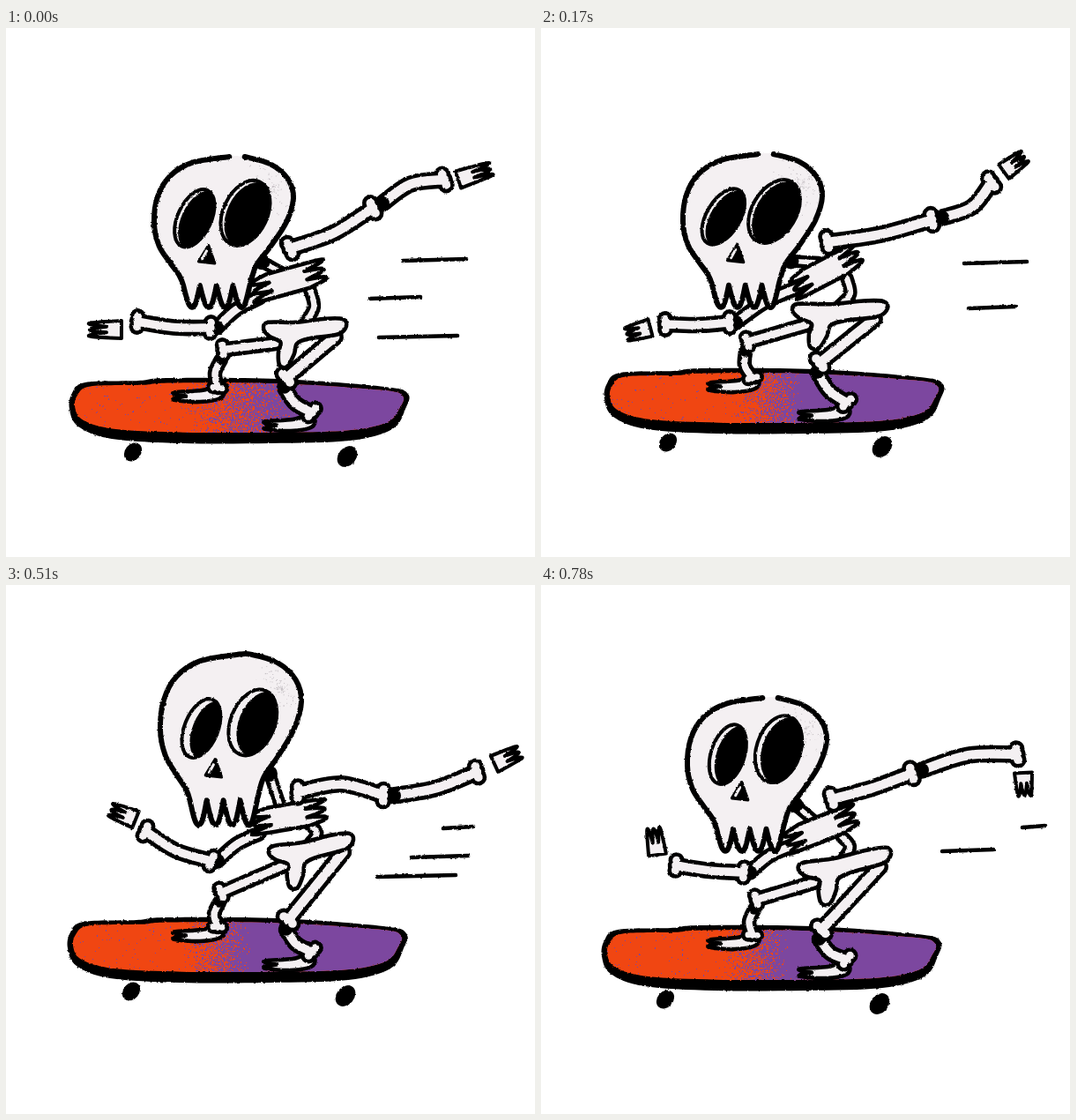
An HTML page with a canvas that plays this animation: 600x600 px, repeating every 0.85 s.

```html
<!DOCTYPE html>
<html lang="en">
<head>
<meta charset="utf-8">
<title>Skating skeleton</title>
<style>
html, body { margin: 0; width: 100%; height: 100%; overflow: hidden; background: #fff; }
canvas { position: absolute; left: 0; top: 0; width: 600px; height: 600px; filter: url(#rough); }
svg { position: absolute; width: 0; height: 0; }
</style>
</head>
<body>
<svg><filter id="rough" x="0" y="0" width="100%" height="100%" color-interpolation-filters="sRGB">
<feTurbulence type="fractalNoise" baseFrequency=".3" numOctaves="2" seed="4" result="n"/>
<feDisplacementMap in="SourceGraphic" in2="n" scale="2.5" xChannelSelector="R" yChannelSelector="G"/>
</filter></svg>
<script>
const STEP = 170, INK = '#000', BONE = '#f4f0f2', ORANGE = '#f04612', PURPLE = '#7c479f', PEN = 4.6;

// skull: centre x, top, half width, height. look: tilt, eye level, pupil shift.
// Hands: wrist edge, direction, length. Lines: x, y, length.
const poses = [
  {
    board: [0, 0], blend: [190, 335], skull: [247, 146, 79, 168], gap: true, look: [25, .4, 4],
    ribs: [320, 287, -18], pelvis: [[292, 341], [386, 338]], knees: [[246, 365], [318, 397]],
    back: { shoulder: [322, 250], joint: [427, 199], wrist: [497, 172], bows: [6, -9], hand: [513, 172, -18, 36] },
    front: { elbow: [239, 340], wrist: [149, 333], bow: -3, hand: [131, 342, 180, 34] },
    lines: [[450, 264, 72], [413, 307, 57], [423, 351, 89]]
  },
  {
    board: [0, -11], blend: [215, 305], skull: [240, 143, 79, 171], gap: true, look: [31, .4, 4],
    ribs: [323, 276, -30], pelvis: [[285, 320], [393, 318]], knees: [[234, 356], [316, 380]],
    back: { shoulder: [325, 243], joint: [455, 215], wrist: [511, 175], bows: [4, 10], hand: [525, 163, -36, 27] },
    front: { elbow: [221, 334], wrist: [141, 336], bow: -2, hand: [124, 340, 165, 26] },
    lines: [[480, 267, 71], [485, 318, 53]]
  },
  {
    board: [0, -24], blend: [240, 305], skull: [256.5, 81, 81, 186], look: [17, .425, 9],
    ribs: [320, 260, -15], pelvis: [[297, 298], [396, 297]], knees: [[234, 344], [318, 376]],
    back: { shoulder: [330, 226], joint: [447, 226], wrist: [522, 176], bows: [-5, 14], hand: [531, 167, -85, 34] },
    front: { elbow: [240, 308], wrist: [163, 279], bow: -3, hand: [147, 279, 108, 28] },
    lines: [[507, 259, 15], [544, 291, 11]]
  },
  {
    board: [-2, -20], blend: [195, 285], skull: [255, 79, 80, 190], look: [22, .425, 9],
    ribs: [320, 263, -12], pelvis: [[298, 304], [394, 289]], knees: [[244, 349], [320, 380]],
    back: { shoulder: [331, 235], joint: [440, 239], wrist: [534, 212], bows: [-11, 5], hand: [554, 203, -25, 29] },
    front: { elbow: [240, 313], wrist: [158, 279], bow: -6, hand: [147, 266, 202, 28] },
    lines: [[496, 276, 34], [460, 309, 64], [421, 331, 89]]
  },
  {
    board: [-3, -11], blend: [200, 292], skull: [245, 128, 79, 171], gap: true, look: [18, .36, 6],
    ribs: [317, 277, -24], pelvis: [[292, 323], [397, 305]], knees: [[244, 357], [318, 391]],
    back: { shoulder: [330, 243], joint: [432, 210], wrist: [540, 192], bows: [2, -8], hand: [547, 213, 87, 24] },
    front: { elbow: [237, 326], wrist: [153, 318], bow: -2, hand: [132, 306, -98, 28] },
    lines: [[455, 302, 58], [546, 275, 26]]
  }
];

let g, seed;
const rand = () => (seed = seed * 16807 % 2147483647) / 2147483647;
const add = ([x, y], dx, dy) => [x + dx, y + dy];

// Places local points at an origin, turned by an angle in degrees.
function place([ox, oy], deg, pts) {
  const c = Math.cos(deg * Math.PI / 180), s = Math.sin(deg * Math.PI / 180);
  return pts.map(([x, y, sharp]) => [ox + x * c - y * s, oy + x * s + y * c, sharp]);
}

// Row of rounded tips with sharp valleys between them.
function fingers(n, valley, tip, from, to) {
  const step = (to - from) / n, pts = [];
  for (let i = 0; i < n; i++) {
    const y = from + step * i;
    pts.push([tip, y + step * .3], [tip, y + step * .65], [valley, y + step, 1]);
  }
  return pts;
}

// Smooth path through [x, y, sharp] points.
function curve(p, closed) {
  const n = p.length, path = new Path2D();
  const at = i => closed ? p[(i + n) % n] : p[Math.max(0, Math.min(n - 1, i))];
  const slope = (i, k) => at(i)[2] ? 0 : (at(i + 1)[k] - at(i - 1)[k]) / 6;
  path.moveTo(p[0][0], p[0][1]);
  for (let i = 0; i < (closed ? n : n - 1); i++) {
    const a = at(i), b = at(i + 1);
    path.bezierCurveTo(a[0] + slope(i, 0), a[1] + slope(i, 1),
      b[0] - slope(i + 1, 0), b[1] - slope(i + 1, 1), b[0], b[1]);
  }
  return path;
}

function ellipse(x, y, rx, ry, deg = 0) {
  const path = new Path2D();
  path.ellipse(x, y, rx, ry, deg * Math.PI / 180, 0, 7);
  return path;
}

function ink(path, width = PEN, color = INK) {
  g.lineWidth = width;
  g.strokeStyle = color;
  g.stroke(path);
}

function fill(path, color = BONE) {
  g.fillStyle = color;
  g.fill(path);
}

function shape(pts, width) {
  const path = curve(pts, true);
  fill(path);
  ink(path, width);
}

const dot = ([x, y], r, color = INK) => fill(ellipse(x, y, r, r), color);

function clipped(path, draw) {
  g.save();
  g.clip(path);
  draw();
  g.restore();
}

// Bowed tube; ends "a" and "b" may carry a pair of knobs.
function bone(a, b, width, bow = 0, ends = '') {
  const dx = b[0] - a[0], dy = b[1] - a[1], len = Math.hypot(dx, dy);
  const nx = -dy / len, ny = dx / len, k = width * .42;
  const path = curve([a, [a[0] + dx / 2 + nx * bow, a[1] + dy / 2 + ny * bow], b]);
  const knobs = [];
  for (const [name, p] of [['a', a], ['b', b]])
    if (ends.includes(name)) knobs.push(add(p, nx * k, ny * k), add(p, -nx * k, -ny * k));
  for (const [grow, color] of [[PEN / 2, INK], [-PEN / 2, BONE]]) {
    ink(path, width + grow * 2, color);
    knobs.forEach(p => dot(p, width * .48 + grow, color));
  }
}

function board({ board: [dx, dy], blend: [a, b] }) {
  const deck = [[72, 432], [75, 414], [90, 402], [150, 400], [185, 397], [310, 398], [430, 407], [456, 415],
    [453, 432], [438, 455], [390, 468], [300, 471], [200, 471], [120, 466], [82, 452]];
  const face = deck.map(([x, y]) => [262 + (x - 262) * .967, 427 + (y - 427) * (y < 427 ? .82 : .72)]);
  g.save();
  g.translate(dx, dy);
  fill(curve(deck, true), INK);
  const top = curve(face, true);
  fill(top, ORANGE);
  clipped(top, () => {
    g.fillStyle = PURPLE;
    g.fillRect(b, 390, 470 - b, 90);
    for (let x = 76; x < b; x++) {
      const k = Math.max(0, (x - a) / (b - a)), chance = .01 + k * k * (3 - 2 * k);
      for (let y = 400; y < 465; y++) if (rand() < chance) g.fillRect(x, y, 1, 1);
    }
  });
  fill(ellipse(144, 481, 11.5, 9, -50), INK);
  fill(ellipse(387, 486, 13, 10, -50), INK);
  g.restore();
}

function hand([x, y, deg, len]) {
  const tips = fingers(3, len * .5, len, -10, 10);
  tips.pop();
  shape(place([x, y], deg, [[0, -10, 1], ...tips, [0, 10, 1]]), 4);
}

function foot(heel) {
  const toes = fingers(2, -36, -48, 11, -2);
  toes.pop();
  shape(place(heel, 0, [[-4, -6], [7, -2], [3, 7], [-20, 11], ...toes, [-18, -2]]));
}

function leg(hip, knee, ankle, width, heel) {
  foot(heel);
  const top = add(knee, -2, 11);
  bone(top, ankle, width - 1, 5, 'b');
  dot(top, width * .45);
  bone(hip, knee, width, 0, 'b');
}

function backArm({ shoulder, joint, wrist, bows, hand: palm }) {
  const dx = joint[0] - shoulder[0], dy = joint[1] - shoulder[1], k = 12 / Math.hypot(dx, dy);
  bone(joint, wrist, 15, bows[1], 'b');
  dot(joint, 8);
  bone(shoulder, add(joint, -dx * k, -dy * k), 15, bows[0], 'ab');
  hand(palm);
}

function frontArm({ elbow, wrist, bow, hand: palm }, chest) {
  bone(add(chest, -33, 19), elbow, 13, 4);
  dot(elbow, 8);
  bone(add(elbow, -7, 0), wrist, 14, bow, 'ab');
  hand(palm);
}

function pelvisShape([[x, y], [x2, y2]]) {
  const len = Math.hypot(x2 - x, y2 - y), deg = Math.atan2(y2 - y, x2 - x) * 180 / Math.PI;
  const local = pts => place([x, y], deg, pts.map(([u, v]) => [u * len, v]));
  const [far, near, root] = local([[.14, 17], [.86, 12], [.5, -4]]);
  const outline = local([[0, 0], [.06, -7], [.4, -6], [.75, -9], [.96, -8], [1, 0], [.9, 9], [.55, 13],
    [.4, 18], [.36, 30], [.27, 44], [.18, 42], [.17, 28], [.2, 16], [.07, 9]]);
  return { outline, far, near, root };
}

function head({ skull: [cx, top, half, high], gap, look: [tilt, level, shift] }) {
  const at = ([u, v, sharp]) => [cx + u * half, top + v * high, sharp];
  const teeth = fingers(4, .87, 1, .37, -.58).map(([v, u, sharp]) => [u, v, sharp]);
  const outline = [[.3, 0], [.67, .05], [.92, .15], [1, .28], [.9, .44], [.68, .6], [.47, .73], [.39, .84],
    ...teeth, [-.64, .8], [-.78, .71], [-.93, .6], [-1, .45], [-.95, .27], [-.77, .13], [-.45, .04], [.08, 0]].map(at);
  const area = curve(outline, true);
  fill(area);
  clipped(area, () => {
    const [sx, sy] = at([.7, .2]);
    g.fillStyle = '#c4bfc3';
    for (let i = 0; i < 120; i++) {
      const t = rand() * 6.283, r = rand() * 36;
      g.fillRect(sx + Math.cos(t) * r, sy + Math.sin(t) * r, 1, 1);
    }
  });
  ink(curve(outline, !gap), 6);

  for (const [u, v, rx, ry] of [[-.42, level + .015, 19, 35], [.31, level - .02, 25, 39]]) {
    const [x, y] = at([u, v]), socket = ellipse(x, y, rx, ry, tilt);
    clipped(socket, () => fill(ellipse(x + shift, y + 2, rx, ry, tilt), INK));
    ink(socket, 4);
  }

  const tip = at([-.22, level + .2]);
  const nose = curve(place(tip, 0, [[0, 0, 1], [-11, 18, 1], [7, 20, 1]]), true);
  fill(nose, INK);
  ink(nose, 3.5);
  ink(curve(place(tip, 0, [[-2, 6], [-7, 15]])), 3, BONE);
}

function draw(p) {
  const [cx, cy, tilt] = p.ribs, chest = [cx, cy], [bx, by] = p.board;
  const { outline, far, near, root } = pelvisShape(p.pelvis);
  g.lineCap = g.lineJoin = 'round';
  board(p);
  p.lines.forEach(([x, y, len]) => ink(curve([[x, y], [x + len, y - 2]])));
  leg(far, p.knees[0], [240, 408 + by], 13, [240, 413 + by]);
  leg(near, p.knees[1], [347, 436 + by], 15, [343, 446 + by]);
  bone(add(chest, 24, 8), root, 11, -8);
  shape(outline);
  frontArm(p.front, chest);
  const [sx, top, half, high] = p.skull, nape = [sx + half * .55, top + high * .71];
  bone(nape, add(chest, -8, -10), 10);
  dot(nape, 9);
  shape(place(chest, tilt, [...fingers(3, 21, 40, -15, 15), ...fingers(3, -21, -39, 15, -15)]));
  backArm(p.back);
  head(p);
}

poses.forEach((pose, i) => {
  const canvas = document.createElement('canvas');
  canvas.width = canvas.height = 600;
  g = canvas.getContext('2d');
  seed = 97 + i * 31;
  draw(pose);
  document.body.append(canvas);
  const share = 1 / poses.length, loop = STEP * poses.length;
  canvas.animate([
    { opacity: 1, offset: 0 }, { opacity: 1, offset: share },
    { opacity: 0, offset: share }, { opacity: 0, offset: 1 }
  ], { duration: loop, delay: i * STEP - loop, iterations: Infinity });
});
</script>
</body>
</html>
```
